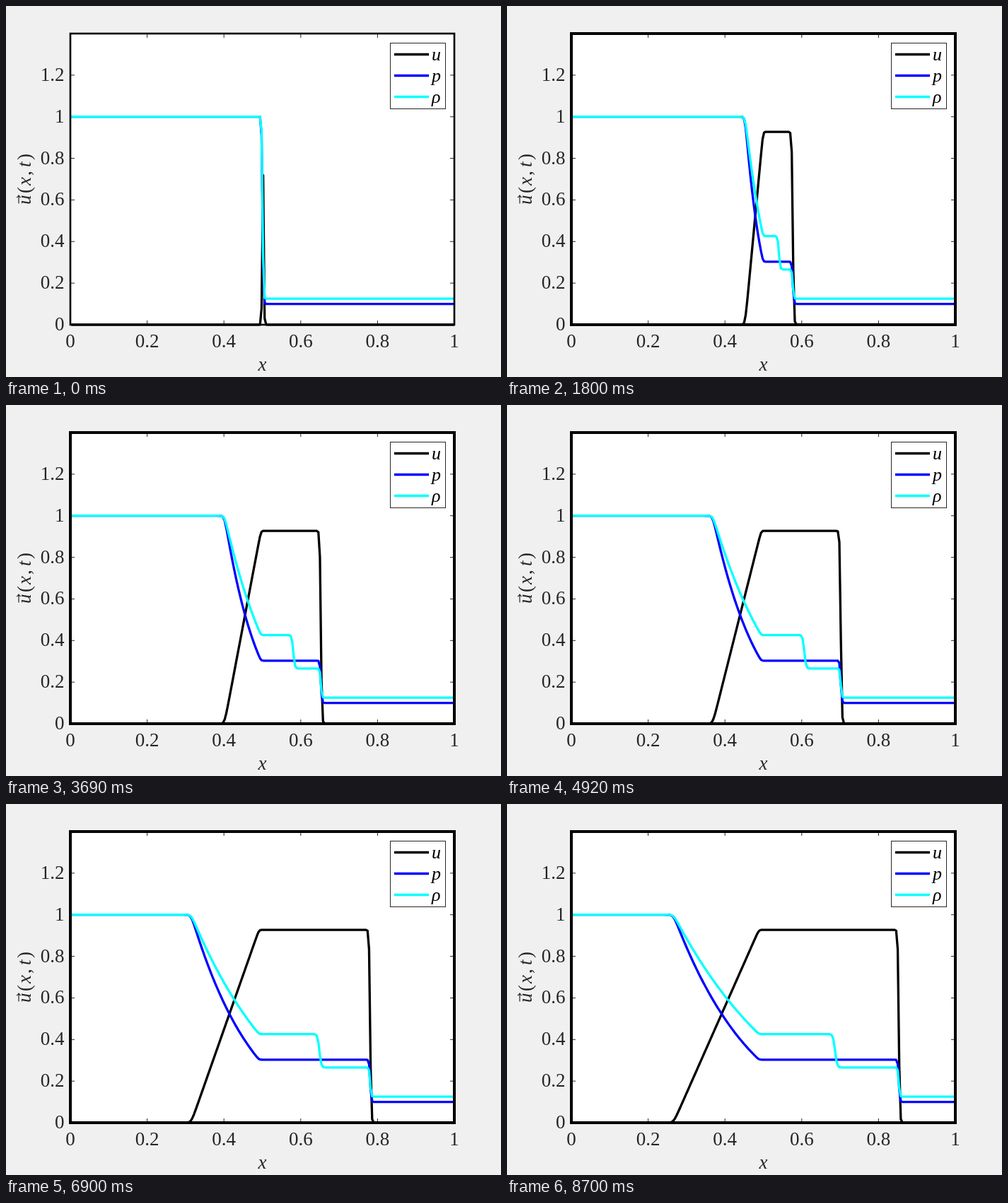
Write an HTML page that moves like this. It is 700 px wide and 525 px high and loops after 8730 ms.

```html
<!DOCTYPE html>
<html lang="en">
<head>
<meta charset="utf-8">
<title>Shock tube</title>
<style>
  html, body { margin: 0; width: 100%; height: 100%; overflow: hidden; background: #f0f0f0; }
  svg { display: block; width: 700px; height: 525px; }
  text { font-family: "Liberation Serif", "Noto Serif", serif; font-size: 27px; fill: #262626; }
  .var { font-style: italic; }
  .legend { font-size: 26px; fill: #000; }
  .curve { fill: none; stroke-width: 3.3; stroke-linejoin: round; }
  .thin { fill: none; stroke: #262626; stroke-width: 1; }
</style>
</head>
<body>
<svg id="plot" viewBox="0 0 700 525">
  <rect width="700" height="525" fill="#f0f0f0"/>
  <rect x="91" y="39" width="543" height="412" fill="#fff"/>
  <path id="ticks" class="thin"/>
  <g id="curves"></g>
  <rect id="frame" x="91" y="39" width="543" height="412" fill="none" stroke="#000"/>
  <g id="labels"></g>
  <text class="var" x="362.5" y="516" text-anchor="middle">x</text>
  <g transform="translate(35 281) rotate(-90)">
    <text><tspan class="var" x="0">u</tspan><tspan x="16">(</tspan><tspan class="var" x="27">x</tspan><tspan x="41">,</tspan><tspan class="var" x="53">t</tspan><tspan x="63">)</tspan></text>
    <path d="M1.5-17H13M10-20Q11-17.5 13.5-17Q11-16.5 10-14" fill="none" stroke="#262626" stroke-width="1.2"/>
  </g>
  <rect x="543.5" y="52.5" width="78" height="93" fill="#fff" stroke="#262626"/>
  <g id="legend"></g>
</svg>
<script>
const STEP_MS = 30, STEPS = 291, CELLS = 250;
const SOUND = Math.sqrt(1.4), U_STAR = 0.92745, TAIL = 0.0703, SHOCK = 1.7522;
const P_RIGHT = 0.1, RHO_RIGHT = 0.125, RHO_MID = 0.2656;

const el = id => document.getElementById(id);
const px = x => 91 + 543 * x;
const py = y => 451 - 412 * y / 1.4;
const softplus = (x, w) => w * (Math.max(x / w, 0) + Math.log1p(Math.exp(-Math.abs(x / w))));
const fallOff = (x, w) => 1 / (1 + Math.exp(x / w));

function add(parent, tag, attrs, text = '') {
  const node = document.createElementNS('http://www.w3.org/2000/svg', tag);
  for (const name in attrs) node.setAttribute(name, attrs[name]);
  node.textContent = text;
  parent.appendChild(node);
  return node;
}

function drawAxes() {
  let d = '';
  for (let i = 0; i <= 6; i++) {
    const value = i / 5, label = String(value), y = py(value);
    add(el('labels'), 'text', { x: 82.5, y: y + 8, 'text-anchor': 'end' }, label);
    if (i > 0) d += `M91 ${y}h6M634 ${y}h-6`;
    if (i > 5) continue;
    const x = px(value);
    add(el('labels'), 'text', { x, y: 483, 'text-anchor': 'middle' }, label);
    if (i > 0 && i < 5) d += `M${x} 451v-6M${x} 39v6`;
  }
  el('ticks').setAttribute('d', d);
}

const curves = [['u', '#000'], ['p', '#00f'], ['ρ', '#0ff']].map(([name, stroke], i) => {
  const y = 68.5 + 30 * i;
  add(el('legend'), 'path', { class: 'curve', stroke, d: `M549 ${y}H598` });
  add(el('legend'), 'text', { class: 'var legend', x: 602, y: y + 8 }, name);
  return add(el('curves'), 'path', { class: 'curve', stroke });
});

// Riemann solution: expansion fan, contact and shock, each slightly smeared.
function makeState(step) {
  const t = 0.0013 + 0.000685 * step, root = Math.sqrt(t);
  const settle = 1 - Math.exp(-step / 10);
  const origin = 0.501 + 0.0015 * settle;
  const head = origin - SOUND * t, tail = origin - TAIL * t;
  const contact = origin + U_STAR * t - 0.0012 * settle;
  const shock = origin + SHOCK * t;
  const headWidth = 0.0006 + 0.0065 * root, tailWidth = 0.0006 + 0.003 * root;
  const contactWidth = 0.0008 + 0.004 * root;
  const shockWidth = 0.0008 + 0.0005 * Math.min(1, step / 40);

  return x => {
    const fan = (softplus(x - head, headWidth) - softplus(x - tail, tailWidth)) / (tail - head);
    const speed = U_STAR * fan;
    const cooling = 1 - 0.2 * speed / SOUND;
    const behindShock = fallOff(x - shock, shockWidth);
    const behindContact = fallOff(x - contact, contactWidth);
    const rho = RHO_MID + behindContact * (cooling ** 5 - RHO_MID);
    return [
      speed * behindShock,
      P_RIGHT + behindShock * (cooling ** 7 - P_RIGHT),
      RHO_RIGHT + behindShock * (rho - RHO_RIGHT)
    ];
  };
}

function render(ms) {
  const step = Math.floor(ms / STEP_MS) % STEPS;
  const state = makeState(step);
  const points = [[], [], []];
  for (let i = 0; i < CELLS; i++) {
    const x = (i + 0.5) / CELLS;
    state(x).forEach((value, j) => points[j].push(px(x).toFixed(2) + ' ' + py(value).toFixed(2)));
  }
  curves.forEach((curve, j) => curve.setAttribute('d', 'M' + points[j].join('L') + 'H634'));
  el('frame').setAttribute('stroke-width', step ? 4 : 2.6);
}

drawAxes();
render(0);
let start;
requestAnimationFrame(function tick(now) {
  start ??= now;
  render(Math.max(0, now - start));
  requestAnimationFrame(tick);
});
</script>
</body>
</html>
```
